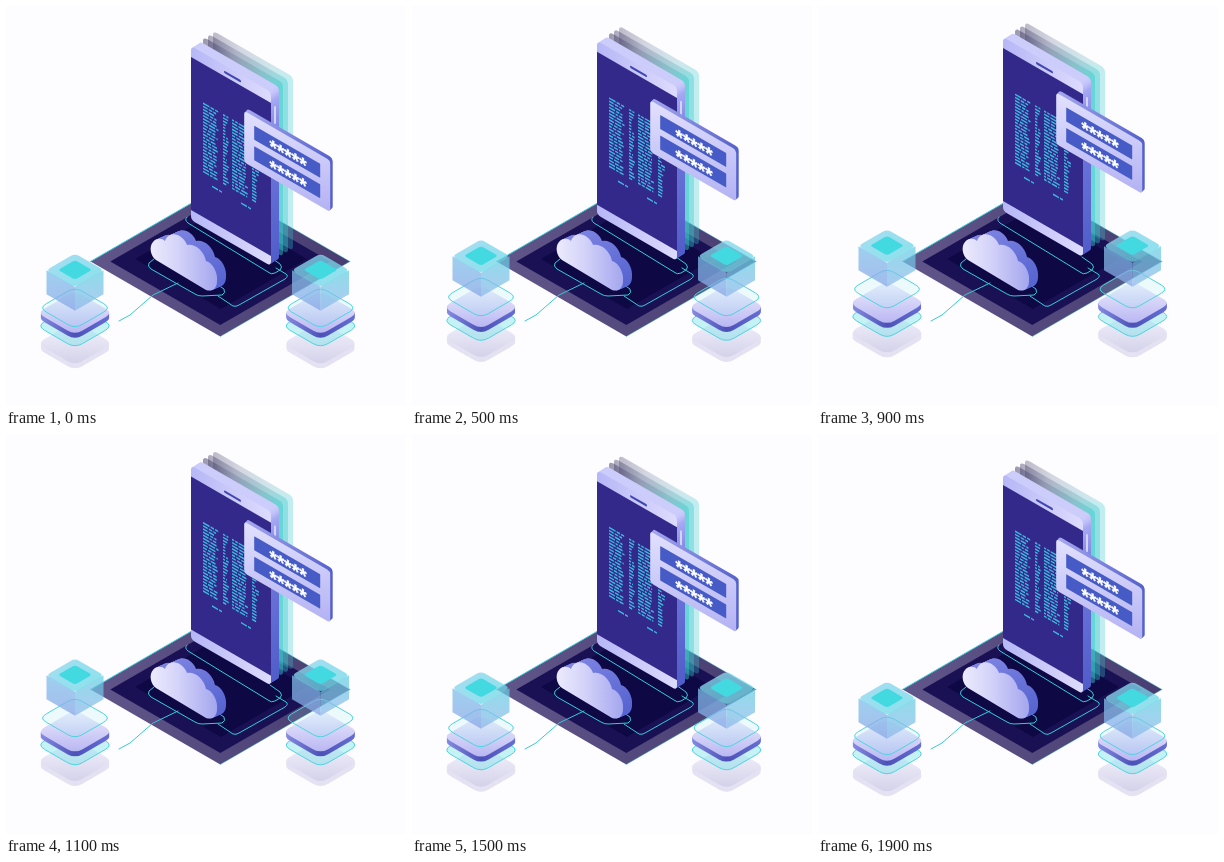
An HTML page that plays this animation: 400x400 px, repeating every 2 s.

```html
<!DOCTYPE html>
<html lang="en">
<head>
<meta charset="utf-8">
<style>
  html, body { margin: 0; width: 100%; height: 100%; overflow: hidden; background: #fdfcff; }
  svg { display: block; width: 100vw; height: 100vh; }
  .wire { fill: none; stroke: #35cbd8; stroke-width: 1; stroke-linejoin: round; stroke-linecap: round; }
  text { font: bold 19px "Liberation Sans", sans-serif; fill: #fff; stroke: #fff; stroke-width: 0.4; }
</style>
</head>
<body>
<svg id="stage" viewBox="0 0 400 400"></svg>
<script>
const LOOP = 2000, STEP = 100;
const SLOPE = 0.577;
const stage = document.getElementById('stage');

// Rounded isometric rhombus; k is the share of each edge given to a corner.
function rhombus(cx, cy, w, h, k = 0.2) {
  const corners = [[cx, cy - h], [cx + w, cy], [cx, cy + h], [cx - w, cy]];
  const toward = (a, b) => a.map((v, i) => (v + (b[i] - v) * k).toFixed(2));
  return corners.map((c, i) => {
    const before = corners[(i + 3) % 4], after = corners[(i + 1) % 4];
    return `${i ? 'L' : 'M'}${toward(c, before)}Q${c} ${toward(c, after)}`;
  }).join('') + 'Z';
}

const path = (d, attrs) => `<path d="${d}" ${attrs}/>`;
const lifted = (amount, content) => `<g data-lift="${amount}">${content}</g>`;
const facing = (x, y, content) => `<g transform="matrix(1 ${SLOPE} 0 1 ${x} ${y})">${content}</g>`;
const panel = (x, y, w, h, r, fill, extra = '') =>
  `<rect x="${x}" y="${y}" width="${w}" height="${h}" rx="${r}" fill="${fill}" ${extra}/>`;

// Stacks shifted copies of a shape to give it thickness, farthest first.
function extrude(dx, dy, count, draw) {
  let out = '';
  for (let i = count; i > 0; i--) {
    out += `<g transform="translate(${dx * i / count} ${dy * i / count})">${draw}</g>`;
  }
  return out;
}

function gradient(id, direction, ...stops) {
  const [x1, y1, x2, y2] = direction;
  const marks = stops.map(([offset, color, opacity = 1]) =>
    `<stop offset="${offset}" stop-color="${color}" stop-opacity="${opacity}"/>`).join('');
  return `<linearGradient id="${id}" x1="${x1}" y1="${y1}" x2="${x2}" y2="${y2}">${marks}</linearGradient>`;
}

const ACROSS = [0, 0, 1, 0], DOWN = [0, 0, 0, 1], DIAGONAL = [0, 0, 1, 1];

const defs = '<defs>' + [
  gradient('border', ACROSS, [0, '#61568a'], [1, '#483d70']),
  gradient('body', ACROSS, [0, '#b6b7f6'], [1, '#dddbfd']),
  gradient('edge', DOWN, [0, '#cfcffc'], [0.06, '#a5a8f2'], [0.3, '#6f78dc'], [1, '#505cc9']),
  gradient('ghost', ACROSS, [0, '#292250'], [0.35, '#75809f'], [0.75, '#62b5bf'], [1, '#2fcfcf']),
  gradient('card', DIAGONAL, [0, '#e2e1fd'], [1, '#b3b2f3']),
  gradient('cardEdge', ACROSS, [0, '#a5a8f0'], [1, '#5561cb']),
  gradient('cloud', ACROSS, [0, '#ecebfd'], [0.4, '#d5d4f9'], [1, '#a4a6ee']),
  gradient('cloudEdge', DIAGONAL, [0, '#8288e4'], [1, '#5563d0']),
  gradient('slabTop', DOWN, [0, '#eeedfd'], [1, '#b9b7f2']),
  gradient('slabSide', ACROSS, [0, '#858be0'], [0.5, '#4c51b8'], [1, '#666ed4']),
  gradient('mirror', DOWN, [0, '#f4f3fd'], [1, '#d4d2e9']),
  gradient('cubeLeft', DOWN, [0, '#7fc0ea', 0.75], [1, '#88a6e6', 0.75]),
  gradient('cubeRight', DOWN, [0, '#63cfe2', 0.72], [1, '#8db5ea', 0.7]),
  gradient('cubeTop', DIAGONAL, [0, '#90d6ee', 0.8], [1, '#64d8e5', 0.75])
].join('') + '</defs>';

function platform() {
  const wires = [
    'M84.5 255.5L185 197.4',
    'M113 315L124 309L147 289L172 277',
    'M181 211Q178 214 182 217L262 266Q265 269 269 267L274 264Q277 261 274 258L264 251',
    'M148 253L143 257Q141 260 145 263L189 288Q192 290 196 290L216 289Q220 287 218 283L209 277',
    'M212 290L227 300Q230 301 233 299L279 273Q283 270 280 268L270 262'
  ];
  const layer = (cx, cy, w, h, fill) => path(rhombus(cx, cy, w, h, 0), `fill="${fill}"`);
  return layer(214.3, 255.5, 129.7, 75, 'url(#border)') +
    layer(214.3, 255.5, 110, 63.5, '#1a1154') +
    layer(215, 253, 86, 50, '#0e0845') +
    path('M344 255.5L214.3 330.5M214.3 180.5L344 255.5', 'class="wire" opacity=".4"') +
    wires.map(d => path(d, 'class="wire"')).join('');
}

function cloud() {
  const outline = 'M150 254C144 250 143 240 147 236C150 232 156 232 159 235' +
    'C161 228 169 226 175 231C178 233 180 236 181 239C188 237 198 244 200 255' +
    'C207 257 212 267 211 275C211 283 206 286 200 284Z';
  return extrude(9, -4, 9, path(outline, 'fill="url(#cloudEdge)"')) +
    path(outline, 'fill="url(#cloud)"');
}

function codeLines() {
  let seed = 7, out = '';
  const random = () => (seed = seed * 16807 % 2147483647) / 2147483647;
  const dash = (x, y, w) => { out += panel(x.toFixed(1), y.toFixed(1), w.toFixed(1), 1.6, 0.3, '#3fb9df'); };
  for (const [from, to] of [[12, 28], [32, 38], [41, 57], [61, 68]]) {
    for (let y = 49.5; y < 120; y += 3.1) {
      const end = to - random() * 4;
      for (let x = from; x < end - 1;) {
        const w = Math.min(2 + random() * 5, end - x);
        dash(x, y, w);
        x += w + 1;
      }
    }
  }
  for (const x of [21, 50]) {
    dash(x, 127.5, 6);
    dash(x + 7, 127.5, 3);
  }
  return out;
}

function phone() {
  const shape = (fill, extra) => facing(185, 40, panel(0, 0, 80, 174, 4, fill, extra));
  const ghosts = [22, 17, 12].map((dx, i) =>
    `<g transform="translate(${dx} ${-2 - dx * 0.6})">${shape('url(#ghost)', `opacity="${0.3 + i * 0.08}"`)}</g>`).join('');
  const front = panel(0, 11, 80, 153, 0, '#32298a') +
    panel(33, 5.5, 17, 2.4, 1.2, '#4147b0') + codeLines();
  return ghosts + extrude(8, -5, 8, shape('url(#edge)')) +
    shape('url(#body)') + facing(185, 40, front) +
    path('M269 101V117', 'stroke="#d5d2fb" stroke-width="2" stroke-linecap="round"');
}

function card() {
  const shape = fill => facing(238.2, 105, panel(0, 0, 86, 51.5, 3, fill));
  const field = y => panel(10, y, 66, 14, 0.5, '#475bc6') +
    `<text x="25.4" y="${y + 17.2}">*****</text>`;
  return extrude(2.5, -2.5, 3, shape('url(#cardEdge)')) + shape('url(#card)') +
    facing(238.2, 105, field(9) + field(29.5));
}

function stack(cx) {
  const tile = (cy, attrs) => path(rhombus(cx, cy, 38, 22), attrs);
  const block = (cy, side, top) => extrude(0, 5, 5, tile(cy, `fill="${side}"`)) + tile(cy, `fill="${top}"`);
  const cy = 264.5, w = 28.5, h = 16.5, depth = 24;
  const face = (side, fill) => path(
    `M${cx + side * w} ${cy}L${cx} ${cy + h}v${depth}L${cx + side * w} ${cy + depth}Z`, `fill="url(#${fill})"`);
  const cube = face(-1, 'cubeLeft') + face(1, 'cubeRight') +
    path(rhombus(cx, cy, w + 0.5, h + 0.5, 0.15), 'fill="url(#cubeTop)"') +
    path(rhombus(cx, cy - 0.5, 17, 9.8, 0.15), 'fill="#43d9e1"');
  return lifted(11, block(337.5, '#e4e2f2', 'url(#mirror)')) +
    lifted(9.5, tile(320, 'fill="#6ee2e6" fill-opacity=".4" stroke="#4bd5df"')) +
    lifted(10, block(307, 'url(#slabSide)', 'url(#slabTop)')) +
    lifted(19, path(rhombus(cx, 302, 36, 20.8), 'fill="#8ce6ec" fill-opacity=".15" stroke="#4bd5df"')) +
    lifted(24.5, cube);
}

stage.innerHTML = defs + platform() + cloud() + lifted(9, phone()) + lifted(18.5, card()) +
  stack(69) + stack(314.5);

const floaters = [...stage.querySelectorAll('[data-lift]')];

function render(now) {
  const time = Math.floor(now % LOOP / STEP) * STEP;
  const rise = (1 - Math.cos(2 * Math.PI * (time + 50) / LOOP)) / 2;
  for (const part of floaters) {
    part.setAttribute('transform', `translate(0 ${(-rise * part.dataset.lift).toFixed(2)})`);
  }
}

const start = performance.now();
function tick() {
  render(performance.now() - start);
  requestAnimationFrame(tick);
}
tick();
</script>
</body>
</html>
```
